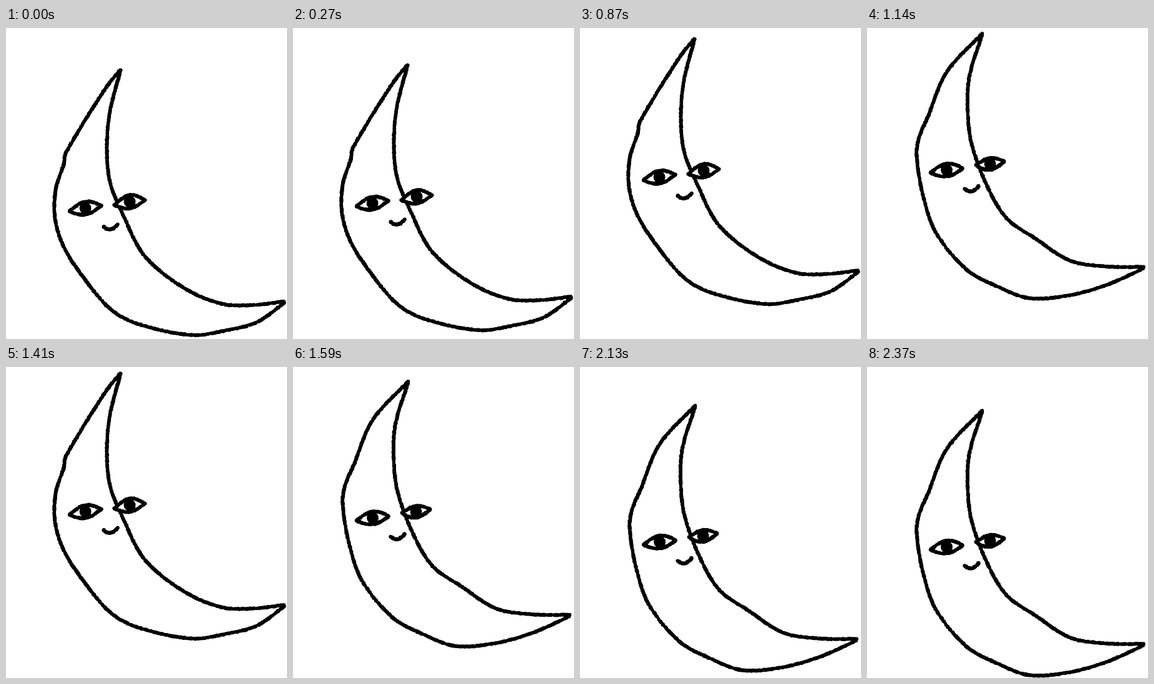
Recreate the animation shown at these times as an HTML page with a canvas. Size 450x498 px, loop 2.4 s.

```html
<!DOCTYPE html>
<html lang="en">
<head>
<meta charset="utf-8">
<title>Moon</title>
<style>
html, body { margin: 0; width: 100%; height: 100%; overflow: hidden; background: #fff; }
canvas { display: block; }
</style>
</head>
<body>
<canvas id="stage" width="450" height="498"></canvas>
<script>
const ctx = document.getElementById('stage').getContext('2d');
const LOOP = 2400, STEP = 30, HOLD = 300, PEAK = 1210, RISE = 61.5;

// Two hand-drawn poses: key points of the outline, and eyes as corner, corner, lid heights.
const slim = {
  back: [[183, 66], [160, 94], [95, 200], [92, 217], [79, 258], [78, 305], [92, 350],
    [122, 397], [165, 448], [207, 472], [295, 491], [350, 484], [402, 470], [446, 439]],
  front: [[183, 67], [166, 132], [161, 190], [166, 246], [187, 299], [222, 365],
    [285, 416], [345, 441], [395, 443], [446, 437]],
  eyes: [[[101, 293], [152, 284], 11, 9.5], [[173, 283], [222, 275], 12, 9]]
};
const full = {
  back: [[184, 69], [127, 131], [95, 207], [83, 235], [79, 266], [90, 332], [111, 390],
    [160, 448], [210, 475], [260, 493], [325, 488], [385, 471], [443, 445]],
  front: [[184, 70], [163, 140], [161, 200], [167, 246], [188, 305], [222, 364],
    [270, 398], [325, 433], [380, 442], [443, 443]],
  eyes: [[[101, 292], [153, 285], 11, 9.5], [[174, 280], [219, 274], 8.5, 10.5]]
};

function seeded(seed) {
  return () => (seed = (seed * 16807) % 2147483647) / 2147483647;
}
const random = seeded(4021);
const jitter = amount => (random() * 2 - 1) * amount;
const mix = (a, b, t) => a + (b - a) * t;
const distance = (a, b) => Math.hypot(b[0] - a[0], b[1] - a[1]);

// Smooth curve through the points, about one sample per pixel.
function spline(points) {
  const slopes = points.map((point, i) => {
    const prev = points[i - 1] || point, next = points[i + 1] || point;
    const span = distance(prev, point) + distance(point, next);
    return [0, 1].map(c => (next[c] - prev[c]) / span);
  });
  return points.slice(1).flatMap((b, i) => {
    const a = points[i], length = distance(a, b), count = Math.ceil(length);
    return Array.from({ length: count }, (_, k) => {
      const t = k / count, s = 1 - t;
      return [0, 1].map(c => mix(a[c], b[c], smooth(t)) +
        length * t * s * (s * slopes[i][c] - t * slopes[i + 1][c]));
    });
  });
}

// Arc from a to b that bulges downwards by the given depth.
function bow(a, b, depth) {
  const count = Math.ceil(distance(a, b) * 1.3);
  return Array.from({ length: count + 1 }, (_, k) => {
    const t = k / count;
    return [mix(a[0], b[0], t), mix(a[1], b[1], t) + depth * Math.sin(Math.PI * t)];
  });
}

function addDot(path, x, y, r) {
  path.moveTo(x + r, y);
  path.arc(x, y, r, 0, Math.PI * 2);
}

function crayon(path, points, radius) {
  for (const [x, y] of points) {
    addDot(path, x + jitter(0.4), y + jitter(0.4), radius + jitter(0.5));
  }
}

function build({ back, front, eyes }) {
  const outline = new Path2D(), whites = new Path2D(), face = new Path2D();
  crayon(outline, spline(back), 2.75);
  crayon(outline, spline(front), 2.75);
  for (const [left, right, up, down] of eyes) {
    const top = bow(left, right, -up), bottom = bow(left, right, down);
    for (const [x, y] of [...top, ...bottom.reverse()]) whites.lineTo(x, y);
    whites.closePath();
    whites.moveTo(...eyes[1][0]);
    crayon(face, top, 2.75);
    crayon(face, bottom, 2.75);
    addDot(face, mix(left[0], right[0], 0.5), mix(left[1], right[1], 0.5) + (down - up) / 2, 9.5);
  }
  crayon(face, bow([156, 318], [178, 314], 6), 2.9);
  return { outline, whites, face };
}

function smooth(p) {
  return p * p * (3 - 2 * p);
}

function lift(t) {
  return RISE * smooth(t < PEAK ? t / PEAK : (LOOP - t) / (LOOP - PEAK));
}

const poses = [slim, full].map(build);

function fill(path, color) {
  ctx.fillStyle = color;
  ctx.fill(path);
}

function draw(now) {
  const t = Math.floor((now % LOOP) / STEP) * STEP;
  const { outline, whites, face } = poses[Math.floor(t / HOLD) % 2];
  ctx.setTransform(1, 0, 0, 1, 0, 0);
  ctx.fillStyle = '#fff';
  ctx.fillRect(0, 0, 450, 498);
  ctx.translate(0.6, 0.6 - lift(t));
  fill(outline, '#000');
  fill(whites, '#fff');
  fill(face, '#000');
}

const start = performance.now();
function tick() {
  draw(performance.now() - start);
  requestAnimationFrame(tick);
}
tick();
</script>
</body>
</html>
```
